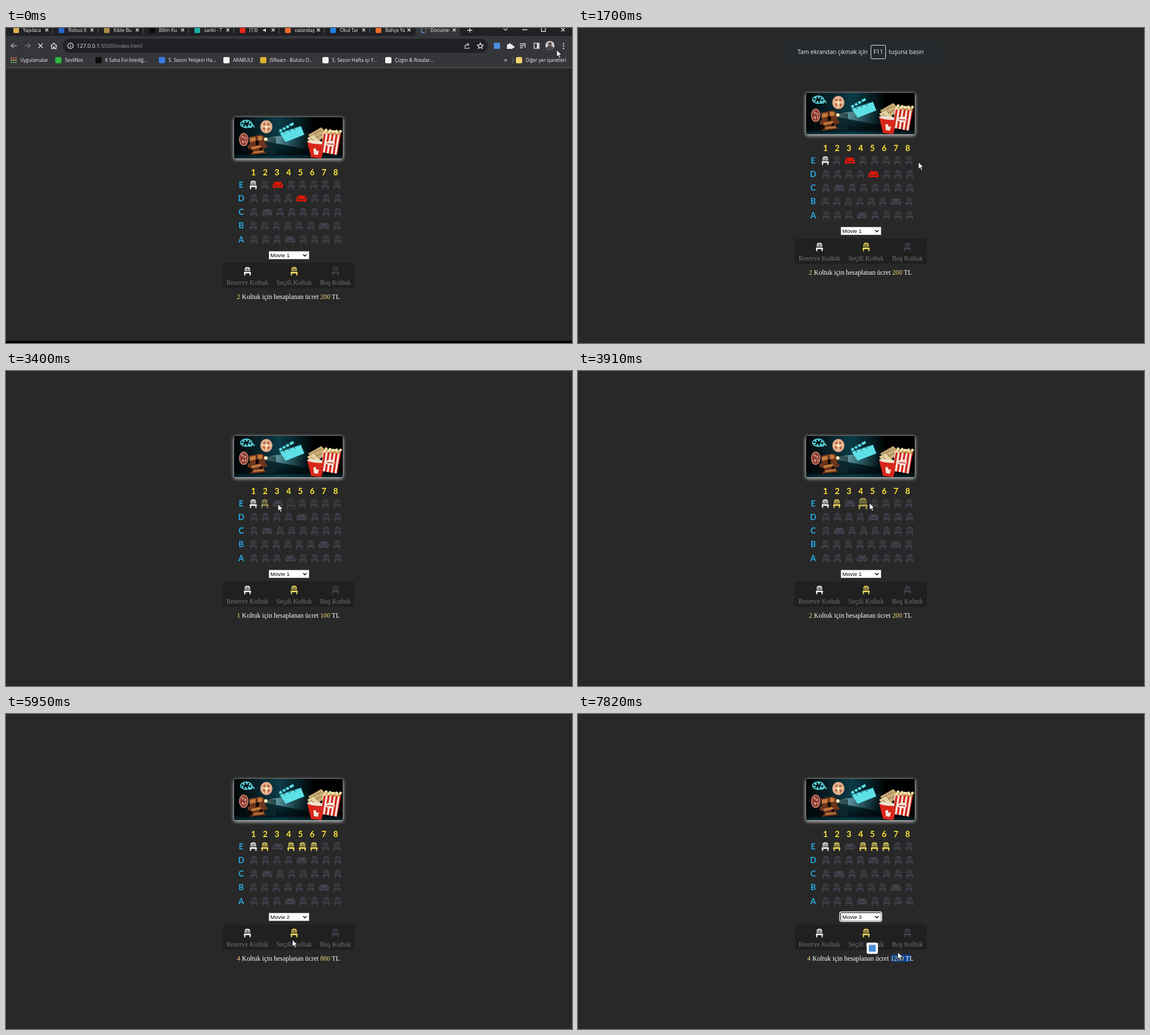
An HTML page for the animation above (7990 ms loop, 1000 px wide and 558 px high).

```html
<!DOCTYPE html>
<html lang="tr">
<head>
<meta charset="utf-8">
<title>Koltuk seçimi</title>
<style>
  html, body { margin: 0; width: 100%; height: 100%; overflow: hidden; background: #282828; }
  svg { display: block; width: 100%; height: 100%; }
  .ui { font-family: "Open Sans", "Noto Sans", sans-serif; font-size: 8.4px; fill: #f1f1f1; }
  .line { fill: none; stroke: #e4e6e8; stroke-width: 1.3; }
  .label { font: 700 14.5px Lato, sans-serif; text-anchor: middle; }
  .serif { font-family: "Liberation Serif", "Times New Roman", serif; font-size: 11.8px; text-anchor: middle; }
  .gold { fill: #f3d879; }
  .banner { filter: drop-shadow(0 2px 3px #bbb) drop-shadow(0 0 1px #777); }
  .seat { transform-box: fill-box; transform-origin: center; }
</style>
</head>
<body>
<svg viewBox="0 0 1000 558" preserveAspectRatio="none">
  <defs>
    <linearGradient id="night">
      <stop offset="0" stop-color="#020607"/><stop offset=".22" stop-color="#082229"/>
      <stop offset=".42" stop-color="#0b3c47"/><stop offset=".62" stop-color="#051a20"/>
      <stop offset=".74" stop-color="#000"/>
    </linearGradient>
    <linearGradient id="floor" x2="0" y2="1">
      <stop offset="0" stop-color="#000" stop-opacity="0"/><stop offset=".8" stop-color="#01090c" stop-opacity=".75"/>
      <stop offset="1" stop-color="#0a4e5e" stop-opacity=".4"/>
    </linearGradient>
    <linearGradient id="beam">
      <stop offset="0" stop-color="#fff6d0"/><stop offset=".25" stop-color="#9ed4dc" stop-opacity=".6"/>
      <stop offset="1" stop-color="#2b8797" stop-opacity="0"/>
    </linearGradient>
    <pattern id="stripes" width="7" height="10" patternUnits="userSpaceOnUse" patternTransform="rotate(9)">
      <path fill="#f5ece4" d="M0 0h7v10H0z"/><path fill="#cf2418" d="M0 0h3.6v10H0z"/>
    </pattern>
    <clipPath id="frame"><rect width="192" height="73" rx="3"/></clipPath>
  </defs>

  <rect width="1000" height="558" fill="#282828"/>

  <g id="browser">
    <rect width="1000" height="14" fill="#202124"/>
    <path fill="#35363a" d="M720 14q4-1 4-6V0h78v8q0 5 4 6z"/>
    <rect y="14" width="1000" height="57" fill="#35363a"/>
    <rect y="70" width="1000" height="1" fill="#58595c"/>
    <rect y="554" width="1000" height="4" fill="#000"/>
    <g id="tabs" class="ui"></g>
    <g class="line">
      <path d="M815 4h9M819.500 0v8M879 1l3.500 3 3.500-3M912 3h9M946 0v6h7V0M981 0l6 6M987 0l-6 6"/>
      <path stroke="#a5a7aa" d="M19 31.500H9M14 27l-5 4.500 5 4.500"/>
      <path stroke="#77797d" d="M33 31.500h10M38 27l5 4.500-5 4.500"/>
      <path id="stop" d="M57 27.500l8 8M65 27.500l-8 8"/>
      <path id="reload" d="M64.500 29a4.300 4.300 0 1 0 .8 3.500M65.500 26v4h-4"/>
      <path d="M79 32l5.500-5 5.500 5M80.500 31v5.500h3v-3h2v3h3V31"/>
    </g>
    <rect x="100" y="19" width="751" height="25" rx="12.500" fill="#202124"/>
    <g class="line" stroke-width="1">
      <circle cx="114" cy="31.500" r="4.800"/><path d="M114 31v3.500M114 28.500v1.200"/>
      <path stroke="#b6b8bb" d="M811 30v6h7v-2M811 33q1-4 6-4M815 26.500l3 2.500-3 2.500"/>
      <path d="M838 26.500l1.500 3.300 3.700.4-2.800 2.400.8 3.600-3.200-1.900-3.200 1.900.8-3.600-2.800-2.400 3.700-.4z"/>
      <path d="M908 28h10M908 31.500h7M908 35h5M917 28v7"/>
      <rect x="933" y="27" width="9" height="9"/><path stroke-width="3" d="M939.500 27v9"/>
    </g>
    <text class="ui" x="125" y="35" style="font-size:9.600px">127.0.0.1<tspan fill="#9aa0a6">:5500/index.html</tspan></text>
    <rect x="862" y="26" width="11" height="11" rx="1.500" fill="#4c8ee0"/>
    <path fill="#eee" d="M885 29h3a2 2 0 1 1 4 0h3v3a2 2 0 1 1 0 3v2h-10v-3a2 2 0 0 0 0-3z"/>
    <circle cx="961" cy="31" r="8" fill="#c9ced1"/>
    <path fill="#4a4542" d="M954.500 35.500q2-4 6.500-4t6.500 4a8 8 0 0 1-13 0z"/><circle cx="961" cy="28.500" r="3.500" fill="#6b5850"/>
    <circle id="menuHover" cx="985" cy="31.500" r="11" fill="#57585c"/>
    <path stroke="#eee" stroke-width="2" stroke-dasharray="2 2" d="M985 27v10"/>
    <g id="marks" class="ui"></g>
  </g>

  <g id="page">
    <g class="banner" transform="translate(403 115)"><g clip-path="url(#frame)">
      <rect width="192" height="73" fill="url(#night)"/>
      <rect y="38" width="192" height="35" fill="url(#floor)"/>
      <path fill="url(#beam)" d="M52 38L135 24v34L52 42z"/>
      <g fill="none" stroke="#5bd3da" stroke-width="1.800">
        <ellipse cx="21.500" cy="12" rx="10" ry="6.500"/>
        <path stroke-width="3.500" stroke-dasharray="3 2.500" d="M15 12a6.500 4 0 1 0 13 0a6.500 4 0 1 0-13 0"/>
        <path d="M26 18q6 1 6-3t4 3"/>
      </g>
      <path fill="#0d2a30" d="M54 36h20v30H54z" opacity=".7"/>
      <path fill="#6c351d" d="M26 35l22-4 7 5v10l-27 4zM24 49l30-3 6 7-8 3 4 8-28 3 4-9-8-3z"/>
      <path fill="#c37a3c" d="M28 37l10-2v7l-10 2zM42 33l8 1v6l-8 2zM30 53l16-3 4 3-18 4zM34 61l18-2v3l-18 2z"/>
      <path fill="#140b08" d="M38 42l6-1v8l-6 1zM26 57l8 3-4 5h-6zM47 53l4 1-2 5-5-1z"/>
      <ellipse cx="17" cy="39.500" rx="7.500" ry="11" fill="#8c3b30" stroke="#d78a77" stroke-width="1.500"/>
      <path fill="#d9a392" d="M13 34l3-2 1 6zM19 34l3 4-4 1zM13 43l4-2v6zM19 42l3-1-2 6z"/>
      <ellipse cx="57" cy="17" rx="10" ry="11" fill="#e7bd94" stroke="#d79a84" stroke-width="1.500"/>
      <path fill="#b4604c" d="M50 13l5-4 1 6zM59 9l5 4-6 3zM50 19l5-1-1 7zM59 18l5 2-4 6z"/>
      <circle cx="57" cy="17" r="2.500" fill="#fff0bd"/>
      <circle cx="56" cy="39" r="3" fill="#fff3c4"/>
      <g fill="#5de0e6">
        <path d="M80 27L118 15l6 16-33 13z"/>
        <path d="M79 23l25-14 2 4-25 14z"/>
      </g>
      <path stroke="#06232a" stroke-width="2" d="M84 20l4 5M90 17l4 5M96 13l4 5"/>
      <path stroke="#06232a" d="M81 27.500l37-12M87 25l3 4M96 22l3 4M105 19l3 4"/>
      <g stroke="#6e5835" stroke-width=".7">
        <path fill="#c9ae77" d="M131 31l23-13 12 12-25 18z"/><path fill="#e4d0a0" d="M129 37l12-7 14 15-16 5z"/>
      </g>
      <path fill="none" stroke="#7d6239" stroke-width="1.500" stroke-dasharray="2 1.500" d="M142 29l12-6M145 36l12-6M135 38l9 5"/>
      <path fill="#d9261a" d="M129 43l33 3-8 27-18-2z"/>
      <ellipse cx="145.500" cy="44.500" rx="16.500" ry="3" transform="rotate(6 145 44)" fill="#eee2cf"/>
      <path fill="#f3e4d8" d="M140 56l4-1 2 5 4-1-2 8-7-1z"/>
      <path fill="url(#stripes)" d="M157 25l32 4-7 38-28-5z"/>
      <g id="corn"></g>
      <ellipse cx="170" cy="47" rx="8" ry="5" fill="#f4e5da"/><path stroke="#cf2418" stroke-width="1.500" d="M164 47l12 1"/>
    </g></g>
    <g id="hall"></g>
    <rect id="ring" x="462.500" y="350.500" width="74" height="17" rx="3" fill="#111" stroke="#fff" stroke-width="1.500"/>
    <rect x="464.500" y="352.500" width="71" height="14" fill="#fff" stroke="#858585"/>
    <text id="movie" x="467" y="363" style="font:9.800px 'Liberation Sans',Arial,sans-serif"></text>
    <path fill="none" stroke="#111" stroke-width="1.600" d="M525 358l3 3 3-3"/>
    <rect x="383" y="373" width="233" height="45" rx="4" fill="#202020"/>
    <g id="legend" class="serif" fill="#747474"></g>
    <rect id="mark" y="426" height="13" fill="#0e438f"/>
    <text id="total" class="serif" x="499" y="436.500" fill="#fff"><tspan id="count" class="gold"></tspan> Koltuk için hesaplanan ücret <tspan id="price" class="gold"></tspan> TL</text>
    <path id="caret" stroke="#f3d879" d="M409.500 426v12"/>
  </g>

  <g id="toast" class="ui" style="font-size:10.300px">
    <rect x="358" y="24" width="282" height="38" rx="2" fill="#242a2d"/>
    <rect x="517.500" y="30.500" width="26" height="24" rx="2" fill="none" stroke="#eee"/>
    <text x="388" y="46">Tam ekrandan çıkmak için</text><text x="522" y="46">F11</text><text x="549" y="46">tuşuna basın</text>
  </g>
  <g id="popup">
    <rect x="510" y="405" width="20" height="20" rx="3" fill="#eef1f4"/><rect x="514" y="409" width="12" height="12" rx="1.500" fill="#4a8fd6"/>
  </g>
  <g id="cursor" fill="#fff" stroke="#111" stroke-width=".8">
    <path id="arrow" d="M0 0v12l2.800-2.600 2 4.600 2-1-2-4.300h4z"/>
    <path id="hand" d="M-1.500 1a1.500 1.500 0 0 1 3 0v5l5 1.200q1.500.5 1 3L6.500 14v4h-7v-2l-4-6q0-2 2-1l1 1z"/>
  </g>
</svg>

<script>
const STEP = 170, LOOP = 7990;
const $ = id => document.getElementById(id);
const show = (id, on) => $(id).style.display = on ? "" : "none";

// Browser bar
const dot = (x, y, size, color) =>
  `<rect x="${x - size / 2}" y="${y - size / 2}" width="${size}" height="${size}" rx="2" fill="${color}"/>`;
const tabs = [["Yapılaca", "#d9b24a"], ["Rolsuz K", "#2467c9"], ["Kible Bu", "#a98d45"], ["Bilim Ku", "#0b0b0b"],
  ["sanki - T", "#16b3a6"], ["(13)", "#e5241c"], ["vatandaş", "#ee6a24"], ["Okul Tar", "#1f7fe0"],
  ["Bahçe Ya", "#ee6a24"], ["Docume", ""]];
$("tabs").innerHTML = tabs.map(([name, color], i) => {
  const x = 80 * i;
  return (color ? dot(x + 18, 4, 10, color) : "") +
    `<text x="${x + 30}" y="7">${name}</text>
     <path class="line" stroke-width="1" d="M${x + 69.5} 1l5 5m0-5l-5 5"/>` +
    (i < 8 ? `<path stroke="#5b5d61" d="M${x + 82.5} 0v10"/>` : "");
}).join("") + `<path fill="#eee" d="M454 3h2l3-2v6l-3-2h-2z"/>
  <g id="spinner" class="line" stroke-width="1.5"><circle cx="738" cy="4" r="4.500" stroke="#676c74"/><path stroke="#5a9cf0" d="M733.500 4a4.500 4.500 0 0 0 4.500 4.500"/></g>
  <g id="globe"><circle cx="738" cy="4" r="5" fill="#b9bcc0"/><path fill="#6a6d71" d="M734 2l4-1v3l-3 2zM739 5l3-1-2 4z"/></g>`;

const marks = [[25, "Uygulamalar", ""], [104, "SesliNot", "#2bb741"], [175, "K Saha Evi-İstediğ...", "#0a0a0a"],
  [287, "5. Sezon Yetişkin Ha...", "#3b7be0"], [401, "ARABULE", "#f2f2f2"], [466, "JSReact - Bulutu D...", "#e0b230"],
  [576, "5. Sezon Hafta içi Y...", "#f2f2f2"], [687, "Çizgin & Rotalar...", "#f2f2f2"],
  [918, "Diğer yer işaretleri", "#f3d471"]];
const apps = ["#e8685c", "#e9b84a", "#62b36b"];
$("marks").innerHTML = marks.map(([x, name, color]) =>
  (color ? dot(x - 11.5, 57, 11, color) : "") + `<text x="${x}" y="60">${name.replace("&", "&amp;")}</text>`).join("") +
  Array.from({ length: 9 }, (_, i) => dot(9.5 + i % 3 * 4, 53 + Math.floor(i / 3) * 4, 2.6, apps[Math.floor(i / 3)])).join("") +
  `<text x="880" y="60" font-size="11">»</text><path stroke="#66686c" d="M895.500 51v12"/>`;

// Popcorn
$("corn").innerHTML = Array.from({ length: 14 }, (_, i) =>
  `<circle cx="${158 + i * 2.3}" cy="${25 + i * .2 + 2.5 * Math.sin(i * 2.3)}" r="2.6" fill="${i % 3 ? "#f2dfaa" : "#c99b55"}"/>`).join("");

// Seats
const CHAIR = "M64 256V128A128 128 0 0 1 192 0h64a128 128 0 0 1 128 128v128h-48V128a80 80 0 0 0-40-69v197h-48V48h-48v208h-48V59a80 80 0 0 0-40 69v128zM43 288h362l42 64v32h-31v128h-64V384H96v128H32V384H1v-32z";
const COUCH = "M160 224v64h320v-64a64 64 0 0 1 64-64h32a96 96 0 0 0-96-96H160a96 96 0 0 0-96 96h32a64 64 0 0 1 64 64zM576 192h-32a32 32 0 0 0-32 32v96H128v-96a32 32 0 0 0-32-32H64a64 64 0 0 0-32 119v137h96v-32h384v32h96V311a64 64 0 0 0-32-119z";
const EM = 15, GAP = 7.2, K = EM / 512;
const GRAY = [67, 66, 79], RED = [226, 22, 8], GOLD = [243, 221, 96], WHITE = [255, 255, 255];
const rgb = c => `rgb(${c.map(Math.round)})`;
const icon = (path, x, y, attrs) =>
  `<g transform="translate(${x} ${y - EM / 2}) scale(${K})"><path class="seat" d="${path}" ${attrs}/></g>`;

const couchAt = { E: 3, D: 5, C: 2, B: 7, A: 4 };
let hall = "";
for (let i = 0; i < 8; i++)
  hall += `<text class="label" fill="#ffe534" x="${437.3 + i * 20.75}" y="218">${i + 1}</text>`;
Object.keys(couchAt).forEach((row, r) => {
  const y = 235 + r * 24.25;
  let x = "EB".includes(row) ? 430.3 : 431.6;
  hall += `<text class="label" fill="#27a9e1" x="415.500" y="${y + 4.5}">${row}</text>`;
  for (let n = 1; n <= 8; n++) {
    const couch = couchAt[row] === n;
    const first = row + n === "E1" ? WHITE : GRAY;
    hall += icon(couch ? COUCH : CHAIR, x, y, `id="${row + n}" fill="${rgb(first)}"`);
    x += (couch ? 640 : 448) * K + GAP;
  }
});
$("hall").innerHTML = hall;
$("legend").innerHTML = [[426.5, "Reserve Koltuk", WHITE], [509, "Seçili Koltuk", GOLD], [582, "Boş Koltuk", GRAY]]
  .map(([x, name, c]) => icon(CHAIR, x - 6.5, 388, `fill="${rgb(c)}"`) + `<text x="${x}" y="412">${name}</text>`).join("");

// seat, colour before, colour after, hover start, click, hover end
const clicks = [
  ["E3", RED, GRAY, 1870, 2040, 2210], ["D5", RED, GRAY, 2210, 2380, 2890],
  ["E2", GRAY, GOLD, 3060, 3230, 3400], ["E4", GRAY, GOLD, 3400, 3570, 4080],
  ["E5", GRAY, GOLD, 4080, 4080, 4250], ["E6", GRAY, GOLD, 4250, 4250, 4420]];

// time, x, y of the pointer tip
const path = [[0, 973, 39], [340, 984, 31], [850, 983, 206], [1020, 983, 210], [1190, 954, 216], [1870, 484, 245],
  [2040, 482, 246], [2380, 518, 264], [2550, 517, 265], [2890, 500, 262], [3060, 460, 245], [3230, 458, 236],
  [3570, 503, 236], [3910, 515, 234], [4250, 544, 236], [4420, 538, 260], [4760, 392, 428], [4930, 396, 433],
  [5440, 640, 437], [5780, 492, 380], [6120, 520, 420], [6460, 556, 432], [6970, 572, 432], [7140, 528, 360],
  [7310, 492, 392], [7480, 553, 430], [7650, 590, 432], [7820, 565, 422]];
const at = t => {
  const i = Math.max(0, path.findLastIndex(p => p[0] <= t));
  const a = path[i], b = path[i + 1] || a;
  const k = b === a ? 0 : (t - a[0]) / (b[0] - a[0]);
  return [a[1] + (b[1] - a[1]) * k, a[2] + (b[2] - a[2]) * k];
};

// latest entry whose time has come
const latest = (list, t) => list.findLast(e => e[0] <= t).slice(1);
const shifts = [[0, 43], [170, 39], [1190, 0], [2380, 10], [3230, 0]];
const movies = [[0, 1], [5780, 2], [7310, 3]];
const marked = [[0, 0, 0], [6800, 555, 7], [6970, 555, 19], [7140, 0, 0], [7650, 553, 13], [7820, 553, 35]];

function draw(t) {
  let count = 2;
  for (const [id, from, to, enter, click, leave] of clicks) {
    const k = Math.min(1, Math.max(0, (t - click) / 300));
    const over = t >= enter && t < leave, s = $(id).style;
    s.fill = rgb(from.map((v, i) => v + (to[i] - v) * k));
    s.transform = over ? "scale(1.32)" : "none";
    s.opacity = over ? .65 : 1;
    if (t >= click) count += to === GOLD ? 1 : -1;
  }
  const [movie] = latest(movies, t), [x, w] = latest(marked, t);
  $("count").textContent = count;
  $("price").textContent = count * movie * 100;
  $("movie").textContent = "Movie " + movie;
  $("mark").setAttribute("x", x);
  $("mark").setAttribute("width", w);
  $("page").setAttribute("transform", `translate(0 ${latest(shifts, t)[0]})`);
  show("total", count > 0);
  show("caret", t === 4930);
  show("ring", movie === 3);
  show("popup", t >= 7820);

  const loading = t < 170;
  show("browser", t < 1190);
  show("stop", loading);
  show("spinner", loading);
  show("reload", !loading);
  show("globe", !loading);
  show("menuHover", t >= 340);
  show("toast", t >= 1190 && t < 3060);

  const hand = t >= 1870 && t < 3400;
  show("hand", hand);
  show("arrow", !hand);
  show("cursor", t < 6460 || t >= 7140);
  $("cursor").setAttribute("transform", `translate(${at(t)})`);
}

const start = performance.now();
function tick(now) {
  const t = Math.max(0, now - start) % LOOP;
  draw(Math.floor(t / STEP) * STEP);
  requestAnimationFrame(tick);
}
tick(start);
</script>
</body>
</html>
```
